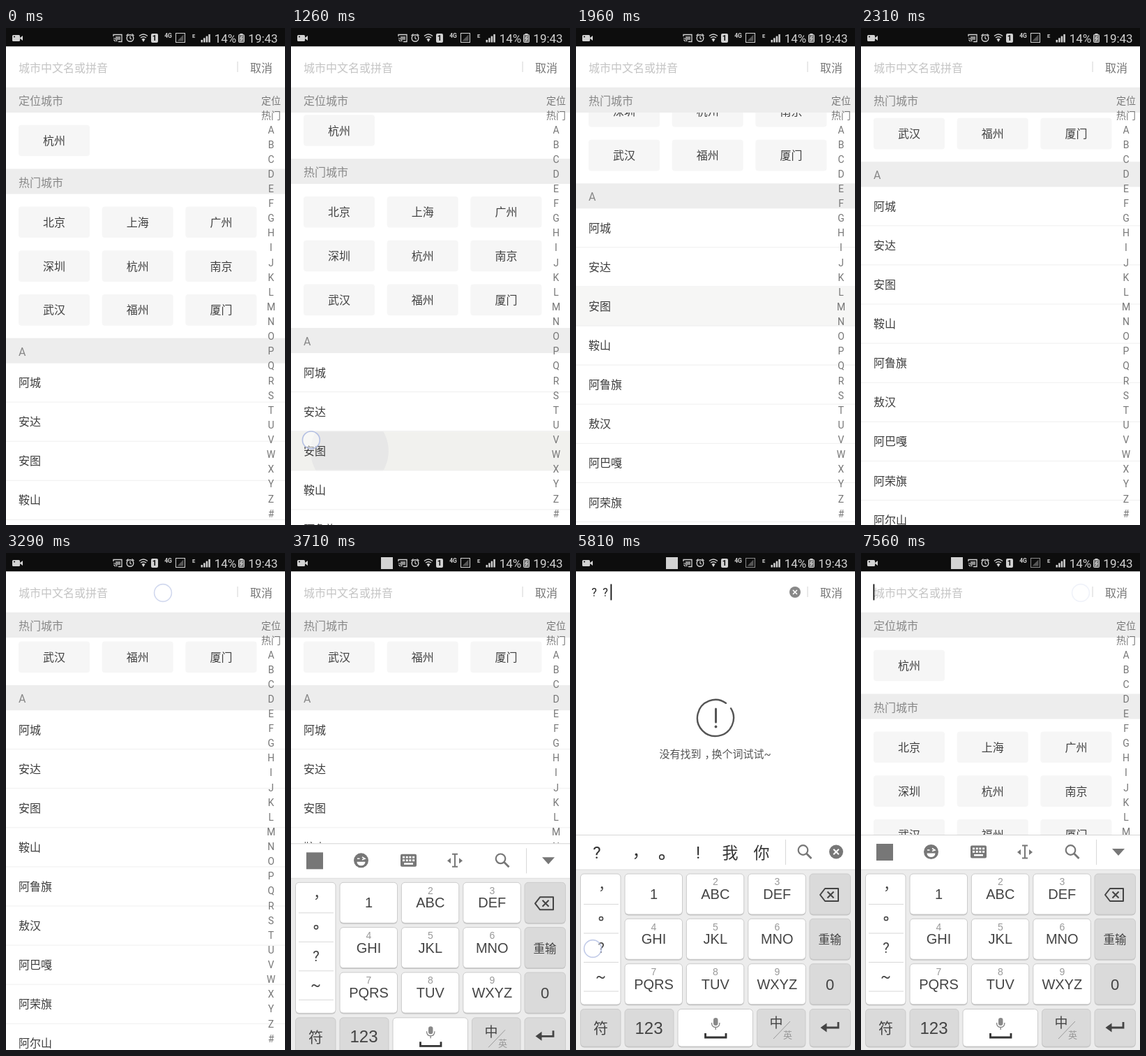
An HTML page for the animation above (8 s loop, 400 px wide and 711 px high).

```html
<!DOCTYPE html>
<html lang="zh-CN">
<head>
<meta charset="utf-8">
<title>城市选择</title>
<style>
html, body { margin: 0; width: 100%; height: 100%; overflow: hidden; background: #fff; }
svg { display: block; width: 100vw; height: 100vh; }
text { font-family: Roboto, "Noto Sans CJK SC", "Noto Sans CJK", sans-serif; white-space: pre; }
text.key { font-family: "Liberation Sans", sans-serif; }
</style>
</head>
<body>
<svg id="stage" viewBox="0 0 400 711" xmlns="http://www.w3.org/2000/svg"></svg>
<script>
const LOOP = 8000, STEP = 70;
const HEAD_H = 36, TOP = 85, ROW0 = 479.5, ROW_H = 56.1;

// ---- markup helpers ----
// y is the visual centre of the text
const text = (x, y, s, size, fill, anchor = 'middle', attrs = '') => {
  const shift = /[^\x00-\x7f]/.test(s) ? 0.38 : 0.355;
  return `<text x="${x}" y="${y + size * shift}" font-size="${size}" fill="${fill}" text-anchor="${anchor}" ${attrs}>${s}</text>`;
};
const label = (x, y, s, size, fill) => text(x, y, s, size, fill, 'middle', 'class="key"');
const rect = (x, y, w, h, fill, r = 0, attrs = '') =>
  `<rect x="${x}" y="${y}" width="${w}" height="${h}" rx="${r}" fill="${fill}" ${attrs}/>`;
const line = (d, stroke, w = 1, attrs = '') =>
  `<path d="${d}" fill="none" stroke="${stroke}" stroke-width="${w}" ${attrs}/>`;
const shape = (d, fill) => `<path d="${d}" fill="${fill}"/>`;
const disc = (x, y, r, fill, attrs = '') => `<circle cx="${x}" cy="${y}" r="${r}" fill="${fill}" ${attrs}/>`;
const group = (id, body, attrs = '') => `<g id="${id}" ${attrs}>${body}</g>`;

// ---- status bar ----
function statusBar() {
  const c = '#d2d2d2';
  let s = rect(0, 0, 400, 26.3, '#0d0d0d');
  s += rect(9, 10, 11, 9, c, 1.5) + shape('M20 14l4-3v7l-4-3z', c) + disc(12, 12.5, 1, '#0d0d0d');
  s += group('ime', rect(129, 6, 17, 17, c));
  s += line('M154 12V9.5h12v10h-5', c, 1.3) + line('M154 14.5a5 5 0 0 1 5 5M154 17a2.5 2.5 0 0 1 2.5 2.5', c, 1.2);
  s += rect(157, 12, 7, 5, '#8c8c8c');
  s += disc(178, 14.5, 4.8, 'none', `stroke="${c}" stroke-width="1.4"`);
  s += line('M178 11.5v3.3l2 1.2M172.5 11l3-2.5M183.5 11l-3-2.5', c, 1.2);
  s += line('M191 11.5q6-5 12 0M193 14q4-3 8 0', c, 1.5) + shape('M194.5 16q2.5-2 5 0l-2.5 4z', c);
  s += rect(208, 8, 10, 13, c, 2) + text(213, 14.5, '1', 11, '#0d0d0d', 'middle', 'font-weight="700"');
  s += text(232.5, 11, '4G', 8.5, c, 'middle', 'font-weight="700"');
  s += rect(243.5, 7.5, 13, 13, 'none', 0, `id="simBox" stroke="${c}"`) + shape('M245.5 18.5h9v-9z', '#555');
  s += text(269, 11, 'E', 7.5, c, 'middle', 'font-weight="700"');
  for (let i = 0; i < 4; i++) s += rect(279.5 + i * 3.6, 17 - i * 2.7, 2.5, 3.5 + i * 2.7, c);
  s += text(314.5, 14.5, '14%', 17, c);
  s += rect(335.5, 8, 4, 2, c) + rect(333.5, 9.5, 8, 11, '#777', 1, `stroke="${c}"`) + line('M339 11l-3 4h3l-3 4', c, 1.2);
  return s + text(368.5, 14.5, '19:43', 17, c);
}

// ---- city list ----
const heads = [['定位城市', TOP], ['热门城市', 201.5], ['A', 443.6]];
const hot = ['北京', '上海', '广州', '深圳', '杭州', '南京', '武汉', '福州', '厦门'];
const cities = ['阿城', '安达', '安图', '鞍山', '阿鲁旗', '敖汉', '阿巴嘎', '阿荣旗', '阿尔山'];
const card = (x, y, s) => rect(x - 51, y - 22.3, 102, 44.6, '#f6f6f6', 4) + text(x, y, s, 16, '#404040');

function cityList() {
  const rowY = ROW0 + 2 * ROW_H;
  let s = rect(0, rowY, 400, ROW_H, '#f1f1ee', 0, 'id="press"');
  s += `<clipPath id="rowClip"><rect x="0" y="${rowY}" width="400" height="${ROW_H}"/></clipPath>`;
  s += `<g clip-path="url(#rowClip)">${disc(0, rowY + 28, 0, '#e7e7e7', 'id="ripple"')}</g>`;
  s += card(69, 161, '杭州');
  hot.forEach((n, i) => s += card(69 + (i % 3) * 119.7, 277.8 + Math.floor(i / 3) * 62.8, n));
  cities.forEach((n, i) => {
    const y = ROW0 + i * ROW_H;
    s += text(18, y + 27.6, n, 16, '#3c3c3c', 'start') + rect(0, y + ROW_H - 1, 400, 1, '#efefef');
  });
  return s;
}

function indexBar() {
  return ['定位', '热门', ...'ABCDEFGHIJKLMNOPQRSTUVWXYZ#']
    .map((n, i) => text(380, 103.3 + i * 21.12, n, 14, '#777')).join('');
}

// ---- search field and empty result ----
const cross = (x, y, r, k, fill) => disc(x, y, r, fill) +
  line(`M${x - k} ${y - k}l${2 * k} ${2 * k}m0 ${-2 * k}l${-2 * k} ${2 * k}`, '#fff', r / 5);

function searchBar() {
  return rect(0, 26, 400, 59, '#fff') +
    group('hint', text(18, 56.5, '城市中文名或拼音', 16, '#c4c4c4', 'start')) +
    group('q1', text(26, 56, '?', 16, '#222')) + group('q2', text(42, 56, '?', 16, '#222')) +
    group('clear', cross(314, 56, 8, 3, '#888')) +
    rect(331.5, 48, 1, 15, '#d4d4d4') + text(366, 56.5, '取消', 16, '#777') +
    rect(0, 44.5, 1.8, 23, '#111', 0, 'id="caret"');
}

function emptyView() {
  const c = '#555';
  return rect(0, 85, 400, 626, '#fff') +
    line('M214.9 214.7A26 26 0 1 0 222 222.2', c, 2.4, 'stroke-linecap="round"') +
    line('M200.5 223v19', c, 3, 'stroke-linecap="round"') + disc(200.5, 248.5, 1.9, c) +
    text(119.5, 287, '没有找到', 15, c, 'start') + text(184.5, 287, '，', 15, c, 'start') +
    text(194.5, 287, '换个词试试~', 15, c, 'start');
}

// ---- keyboard ----
const key = (x, y, w, h, fill = '#fff') =>
  rect(x, y + 1.5, w, h, '#c4c4c4', 5) + rect(x, y, w, h, fill, 5, 'stroke="#cbcbcb"');
const lens = (x, y) => disc(x - 2.5, y - 2.5, 6.8, 'none', 'stroke="#777" stroke-width="2.2"') +
  line(`M${x + 2.5} ${y + 2.5}l7 7`, '#777', 2.8);

function tools() {
  const c = '#777';
  let s = rect(22, 416, 24, 24, c);
  s += disc(100.5, 427.5, 10.5, c) + line('M95 425h3.5M102 422.5l4 2.5-4 1.5', '#fff', 1.6) + shape('M94.5 429.5h12a6 5.5 0 0 1-12 0z', '#fff');
  s += rect(157, 418.5, 23, 18, c, 2);
  for (let i = 0; i < 8; i++) s += rect(160 + (i % 4) * 4.7, 421.5 + (i >> 2) * 4.5, 3, 2.8, '#fff');
  s += rect(162, 431, 13, 2.5, '#fff');
  s += line('M231 418.5h8M231 436.5h8M235 418.5v18', c, 2) + shape('M229 424v8l-5-4zM241 424v8l5-4z', c);
  return s + lens(303, 427.5) + rect(337, 410, 1, 36, '#d8d8d8') + shape('M360 423h18l-9 10z', c);
}

function candidates() {
  const c = '#333';
  return text(30, 428, '?', 24, c) + text(80.5, 426, '，', 24, c, 'start') + text(175, 428, '!', 24, c) +
    disc(123, 435, 3.3, 'none', `stroke="${c}" stroke-width="1.6"`) +
    text(221, 428, '我', 23, c) + text(266, 428, '你', 23, c) +
    rect(300, 410, 1, 36, '#d8d8d8') + lens(328, 427.5) + cross(373, 427.5, 10, 3.8, '#777');
}

function keyboard() {
  const c = '#444', gray = '#dadada', rows = [459, 523.3, 587.7], cols = [70, 158.3, 246.8];
  let s = rect(0, 403, 400, 308, '#ececec') + rect(0, 403, 400, 50, '#fff') + rect(0, 403, 400, 1, '#d6d6d6') + rect(0, 452.5, 400, 1, '#dedede');
  s += group('tools', tools()) + group('cands', candidates());
  s += key(6.5, 459, 57.5, 187) + rect(7, 544, 56.5, 41, '#d6d6d6', 0, 'id="keyDown"');
  for (let i = 0; i < 4; i++) s += rect(11, 502 + i * 41.5, 50, 1, '#d8d8d8');
  s += text(32, 473, '，', 21, c, 'start') + disc(36, 523, 2.6, 'none', `stroke="${c}" stroke-width="1.5"`) +
    text(36, 564.5, '?', 20, c) + text(35.5, 605, '~', 22, c);
  ['1', 'ABC', 'DEF', 'GHI', 'JKL', 'MNO', 'PQRS', 'TUV', 'WXYZ'].forEach((n, i) => {
    const x = cols[i % 3], y = rows[Math.floor(i / 3)];
    s += key(x, y, 82.5, 58) + label(x + 41.5, y + 29, n, 20, c);
    if (i) s += label(x + 41.5, y + 11.5, String(i + 1), 14, '#999');
  });
  rows.forEach(y => s += key(335, y, 58.5, 58, gray));
  s += line('M357 480h19v18h-19l-7-9z', c, 2, 'stroke-linejoin="round"') + line('M360.5 484.5l9 9m0-9l-9 9', c, 2);
  s += text(364, 553, '重输', 16.5, c) + label(364, 617, '0', 22, c);
  s += key(6.5, 652.5, 57.5, 53.5, gray) + text(35.5, 679.5, '符', 21, c);
  s += key(70, 652.5, 70, 53.5, gray) + label(104.5, 679.5, '123', 24, c);
  s += key(146, 652.5, 107.5, 53.5);
  s += rect(197, 665, 6.5, 11, '#888', 3.2) + line('M194.5 672q0 6.5 5.7 6.5t5.7-6.5M200.2 678v4', '#888', 1.4) + line('M185.5 687v6h29.5v-6', '#333', 2.8);
  s += key(259.5, 652.5, 69.5, 53.5, gray) + text(287, 672, '中', 19, c) + text(303.5, 689, '英', 13, '#999') + line('M307 670l-24 25', '#999');
  s += key(335, 652.5, 58.5, 53.5, gray) + line('M376 671v8h-18', c, 2.8) + shape('M350.5 679l9-6.5v13z', c);
  return s;
}

const stage = document.getElementById('stage');
stage.innerHTML = rect(0, 0, 400, 711, '#fff') +
  group('list', cityList()) +
  heads.map((h, i) => group('head' + i, rect(0, 0, 400, HEAD_H, '#ededed') + text(18, 19.4, h[0], 16, '#888', 'start'))).join('') +
  indexBar() + group('empty', emptyView()) + searchBar() + statusBar() +
  group('board', keyboard()) +
  disc(0, 0, 12.4, '#fff', 'id="touch" fill-opacity=".5" stroke="#b3bfe3" stroke-width="1.6"');

// ---- motion ----
const $ = id => document.getElementById(id);
const set = (id, attrs) => { for (const k in attrs) $(id).setAttribute(k, attrs[k]); };
const show = (id, on) => $(id).style.display = on ? '' : 'none';
const ramp = (t, a, b) => Math.min(1, Math.max(0, (t - a) / (b - a)));
const within = (t, a, b) => t >= a && t < b;

// value along a flat list of time, value pairs
function track(t, p) {
  if (t <= p[0]) return p[1];
  for (let i = 2; i < p.length; i += 2)
    if (t < p[i]) return p[i - 1] + (p[i + 1] - p[i - 1]) * ramp(t, p[i - 2], p[i]);
  return p[p.length - 1];
}

// accelerating drag, then a fling that slows down
function scrollAt(t) {
  if (t >= 7140) return 0;
  if (t < 1540) return 99 * ramp(t, 1086, 1540) ** 2;
  return 254.5 - 155.5 * (1 - ramp(t, 1540, 2520)) ** 2.76;
}

const touches = [
  { x: 40, y: 604, a: [880, 0, 980, 1, 1540, 0.95, 1820, 0] },
  { x: 225, y: 57, a: [2840, 0, 2940, 0.9, 3290, 0.6, 3430, 0.6, 3570, 0] },
  { x: 24, y: 566, a: [4440, 0, 4550, 1, 4830, 0.9, 5180, 0] },
  { x: 24, y: 566, a: [5290, 0, 5390, 1, 5810, 0.8, 6090, 0] },
  { x: 315, y: 57, a: [6900, 0, 7000, 0.9, 7280, 0.8, 7560, 0.2] }
];

function caretOn(t) {
  const even = from => Math.floor((t - from) / 210) % 2 === 0;
  if (t < 3010) return false;
  if (t < 4480) return even(3010);
  if (t < 4900) return false;
  return t < 5880 || t >= 7350 || even(6090);
}

function draw(t) {
  const s = scrollAt(t);
  set('list', { transform: `translate(0 ${-s})` });
  heads.forEach((h, i) => {
    let y = Math.max(TOP, h[1] - s);
    if (heads[i + 1]) y = Math.min(y, heads[i + 1][1] - s - HEAD_H);
    set('head' + i, { transform: `translate(0 ${y})` });
  });

  const grow = 0.55 * ramp(t, 980, 1540) + 0.45 * ramp(t, 1540, 1750);
  set('press', { opacity: track(t, [950, 0, 1120, 1, 1540, 1, 1960, 0.6, 2240, 0]) });
  set('ripple', { cx: 40 + 160 * grow, r: 203 * grow, opacity: track(t, [1540, 1, 1890, 0]) });

  const typed = within(t, 4900, 7140);
  show('hint', !typed);
  show('q1', typed);
  show('q2', within(t, 5460, 7140));
  show('clear', typed);
  show('empty', within(t, 4970, 7140));
  show('caret', caretOn(t));
  set('caret', { x: !typed ? 17.5 : t < 5460 ? 33.5 : 49.5 });

  show('ime', t >= 3500);
  set('simBox', { stroke: t < 4340 ? '#d2d2d2' : '#8a8a8a' });
  const rise = 1 - (1 - ramp(t, 3430, 3780)) ** 2;
  show('board', rise > 0);
  set('board', { transform: `translate(0 ${308 * (1 - rise)})` });
  const cands = within(t, 4620, 7210);
  show('cands', cands);
  show('tools', !cands);
  show('keyDown', within(t, 4480, 4620) || within(t, 5320, 5460));

  let now = touches[0];
  for (const p of touches) if (t >= p.a[0]) now = p;
  const drag = now === touches[0];
  set('touch', {
    cx: drag ? 40 - 29 * ramp(t, 1086, 1540) : now.x,
    cy: drag ? now.y - Math.min(s, 99) : now.y,
    opacity: track(t, now.a)
  });
}

const start = performance.now();
function tick() {
  const t = (performance.now() - start) % LOOP;
  draw(Math.floor(t / STEP) * STEP);
  requestAnimationFrame(tick);
}
tick();
</script>
</body>
</html>
```
